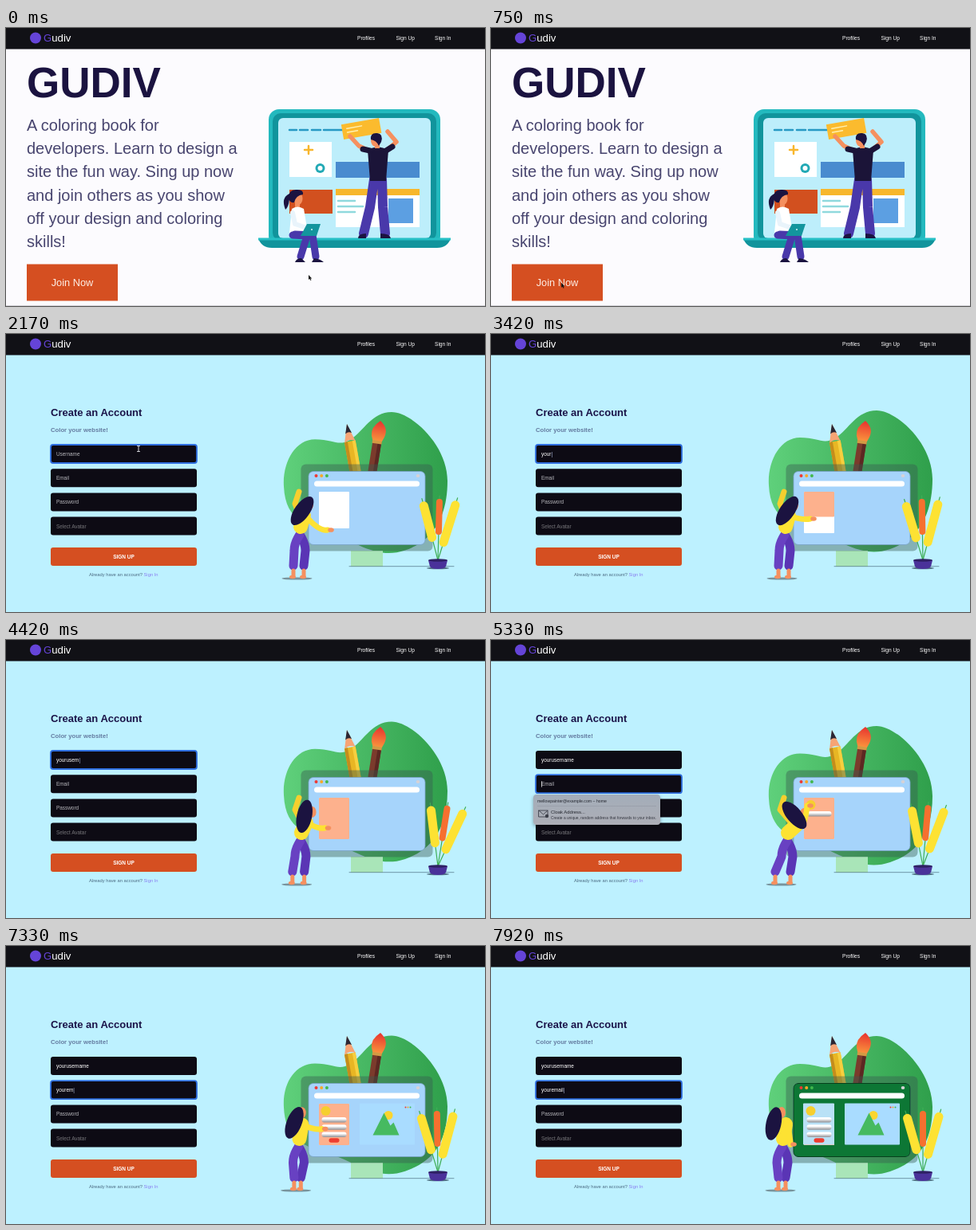
Animation, 600 px wide and 349 px high, one loop 8000 ms. Source, as an HTML page:

```html
<!DOCTYPE html>
<html lang="en">
<head>
<meta charset="utf-8">
<title>Gudiv</title>
<style>
  html, body { margin: 0; width: 100%; height: 100%; overflow: hidden; }
  svg { display: block; width: 100vw; height: 100vh; font-family: "Liberation Sans", Arial, sans-serif; }
  text { white-space: pre; }
</style>
</head>
<body>
<svg viewBox="0 0 600 349">
  <defs>
    <linearGradient id="leaf"><stop stop-color="#5fd07b"/><stop offset="1" stop-color="#2f9f4b"/></linearGradient>
    <linearGradient id="bar" x2="0" y2="1"><stop offset=".3" stop-color="#fff"/><stop offset="1" stop-color="#8d8d92"/></linearGradient>
    <linearGradient id="paint" x2="0" y2="1"><stop stop-color="#e8322f"/><stop offset="1" stop-color="#f9913c"/></linearGradient>
    <linearGradient id="popup" x2="0" y2="1"><stop stop-color="#a3adb9"/><stop offset="1" stop-color="#adaeb6"/></linearGradient>
    <filter id="shade" x="-10%" y="-20%" width="120%" height="150%"><feDropShadow dx="0" dy="2" stdDeviation="2" flood-opacity=".35"/></filter>
  </defs>
  <g id="home"></g>
  <g id="signup"></g>
  <g id="nav"></g>
  <g id="pointer"></g>
</svg>
<script>
const LOOP = 8000, PAGE_SWITCH = 1000;
const NAVY = '#1b1340', SKIN = '#f5905f', YELLOW = '#fde233', PURPLE = '#5a35b5', RUST = '#d54f21';
const LIGHTS = ['#ee3a33', '#f6a928', '#42b84c'];
const layer = id => document.getElementById(id);
const clamp = v => Math.max(0, Math.min(1, v));
const ramp = (t, from, to) => {
  const v = clamp((t - from) / (to - from));
  return v * v * (3 - 2 * v);
};

// Eased lookup in rows of [time, ...values].
function pose(t, rows) {
  const i = rows.findIndex(row => row[0] > t);
  if (i < 0) return rows[rows.length - 1].slice(1);
  if (i === 0) return rows[0].slice(1);
  const a = rows[i - 1], b = rows[i], k = ramp(t, a[0], b[0]);
  return a.slice(1).map((v, n) => v + (b[n + 1] - v) * k);
}

// Shape helpers
const rect = (x, y, w, h, fill, r = 0, extra = '') => `<rect x="${x}" y="${y}" width="${w}" height="${h}" rx="${r}" fill="${fill}" ${extra}/>`;
const oval = (x, y, rx, ry, fill, extra = '') => `<ellipse cx="${x}" cy="${y}" rx="${rx}" ry="${ry}" fill="${fill}" ${extra}/>`;
const dot = (x, y, r, fill) => oval(x, y, r, r, fill);
const path = (d, fill) => `<path d="${d}" fill="${fill}"/>`;
const line = (d, color, width) => `<path d="${d}" fill="none" stroke="${color}" stroke-width="${width}" stroke-linecap="round" stroke-linejoin="round"/>`;
const group = (transform, content) => `<g transform="${transform}">${content}</g>`;
const text = (x, y, size, fill, content, extra = '') => `<text x="${x}" y="${y}" font-size="${size}" fill="${fill}" ${extra}>${content}</text>`;
const BOLD = 'font-weight="700"', MIDDLE = 'text-anchor="middle"';

function drawNav() {
  return rect(0, 0, 600, 26.5, '#111116') + dot(37, 12.5, 7, '#6544d8') +
    text(47, 17, 13.2, '#fff', '<tspan fill="#6544d8">G</tspan>udiv') +
    ['Profiles', 'Sign Up', 'Sign In'].map((s, i) => text(440 + i * 48.5, 14.5, 6.6, '#fff', s)).join('');
}

function drawLaptop() {
  return rect(329, 102, 215, 172, '#23b9be', 13) + rect(334, 107, 205, 160, '#11949c', 10) + rect(341, 113, 191, 151, '#bdeefb', 6) +
    path('M316 264H557Q553 276 540 276H333Q320 276 316 264Z', '#11949c') + rect(316, 263.5, 241, 3, '#27c0c6');
}

function drawLayout() {
  return line('M355 128H364M368 128H378M383 128H394M398 128H421', '#2799c4', 2.5) +
    rect(355, 143, 53, 44, '#fff') + line('M379 148V158M374 153H384', '#f8b62d', 2.5) +
    dot(393.5, 176, 6, '#22a9b5') + dot(393.5, 176, 3, '#fff') +
    rect(413, 168, 105, 20, '#498bcf') + rect(355, 203, 54, 30, '#d2501f') +
    rect(413, 202, 105, 48, '#fff') + rect(413, 202, 105, 8, '#f7b72c') +
    line('M416 217H437M416 224H447M416 231H437', '#8fd9dd', 2.5) + rect(479, 214, 31, 31, '#5c9fe2') +
    group('rotate(-10 445 126)', rect(421, 117, 48, 19, '#fbbb2e') + line('M427 123H446M427 128H440', '#fff0b0', 1.5));
}

function drawMan() {
  return line('M457 155L442 148 431 136M475 155L489 143 478 130', SKIN, 5.5) +
    line('M461 190L456 225 448 258M471 190L472 225 475 258', '#4938aa', 12) +
    path('M441 264Q441 258 451 258V264ZM469 264V258Q481 258 482 264Z', NAVY) +
    path('M453 153Q465 146 479 153L476 192H456Z', '#1b1438') + line('M456 154L447 152M476 154L484 149', '#1b1438', 7) +
    rect(462, 141, 6, 10, SKIN) + oval(463, 141, 6, 8, SKIN) + path('M457 140Q456 131 465 132 473 133 470 143L467 148Q464 141 457 140Z', NAVY);
}

function drawReader() {
  return path('M355 208Q344 213 350 228 354 225 355 215Z', NAVY) + rect(362, 217, 6, 10, SKIN) + oval(366, 214, 5.5, 8, SKIN) +
    path('M354 213Q354 202 365 203 373 203 372 209 363 210 361 219 355 220 354 213Z', NAVY) +
    path('M358 227Q365 222 373 227L378 257H355Z', '#fff') + line('M359 232L362 246 374 250', '#e9f4fb', 6) +
    line('M359 260L377 261 369 287M362 259L384 260 388 287', '#4938aa', 9) +
    path('M362 294Q364 289 370 289L375 294ZM383 294L386 289Q394 290 398 294Z', NAVY) +
    path('M377 246H394L389 261H369Z', '#13959d') + dot(383, 253, 1, '#d8f5f6');
}

function drawHome() {
  const copy = ['A coloring book for', 'developers. Learn to design a', 'site the fun way. Sing up now',
    'and join others as you show', 'off your design and coloring', 'skills!'];
  return rect(0, 0, 600, 349, '#fcfbfe') + text(26, 87, 53, NAVY, 'GUDIV', BOLD) +
    copy.map((s, i) => text(26, 129 + i * 29.2, 20, '#48456f', s)).join('') +
    rect(26, 296.5, 114, 46, RUST) + text(83, 324, 12.8, '#fdeee6', 'Join Now', MIDDLE) +
    drawLaptop() + drawLayout() + drawMan() + drawReader() + rect(0, 348, 600, 1, '#d3d2d8');
}

function drawPopup() {
  return rect(53, 194, 159, 38, 'url(#popup)', 4, 'filter="url(#shade)"') +
    text(58, 203.5, 5.2, '#24262e', 'mellowpainter@example.com – home') + rect(58, 208, 149, .5, '#8d929d') +
    line('M60 214H71V222H60ZL65.5 219 71 214', '#3b3e48', .9) + dot(70, 221, 2.2, '#3b3e48') +
    text(75, 218, 5.9, '#24262e', 'Cloak Address...') +
    text(75, 225, 4.85, '#343741', 'Create a unique, random address that forwards to your inbox.');
}

function drawForm(t) {
  const typed = (word, start) => word.slice(0, Math.max(0, Math.floor((t - start) / 200)));
  const focus = t < 1750 ? -1 : t < 5050 ? 0 : 1;
  const focusStart = focus ? 5050 : 1750;
  const values = [typed('yourusername', 2580), typed('youremail', 6030)];
  const fields = ['Username', 'Email', 'Password', 'Select Avatar'].map((label, i) => {
    const y = 139 + i * 30.2, active = i === focus, value = values[i];
    const caret = active && value ? '<tspan fill="#aebbe0">|</tspan>' : '';
    const blink = active && !value && (t - focusStart) % 800 < 400;
    return rect(56, y, 183, 23, '#0d0b14', 3, active ? 'stroke="#2f6fe0" stroke-width="1.8"' : '') +
      text(63, y + 14, 6.4, value ? '#fff' : i === 3 ? '#77777b' : '#b8b8bd', (value || label) + caret) +
      (blink ? rect(63, y + 8, .7, 7.5, '#fff') : '');
  }).join('');
  return text(56, 103, 13, '#1a1348', 'Create an Account', BOLD) + text(56, 123, 7.7, '#647ba0', 'Color your website!', BOLD) + fields +
    rect(56, 268, 183, 23, RUST, 3) + text(147.5, 282.3, 6.5, '#fff', 'SIGN UP', `${BOLD} ${MIDDLE}`) +
    text(104, 304, 5.8, '#4a6a80', 'Already have an account?') + text(172.5, 304, 5.8, '#8a7ff0', 'Sign In') +
    (t > 5150 && t < 6200 ? drawPopup() : '');
}

function drawBlob(t) {
  const [swell] = pose(t, [[1000, .05], [1330, .18], [2170, .88], [3000, 1], [3420, 1], [5330, .3], [6670, .06], [7920, 0]]);
  const left = 203 - 13 * swell, lobe = 148 - 18 * swell, top = 113 - 17 * swell, right = 202 - 20 * swell, base = 283 - 13 * swell;
  return path(`M348 ${left}C346 ${left - 30} 362 ${lobe} 387 ${lobe}S416 ${lobe + 10} 432 ${lobe} 458 ${top} 483 ${top}
    553 ${right - 45} 553 ${right} 535 ${base - 12} 500 ${base} 440 ${base - 10} 410 ${base - 20} 350 ${left + 45} 348 ${left}Z`, 'url(#leaf)');
}

function drawTools() {
  const pencil = rect(-7, 22, 14, 40, '#e8b624') + rect(-7, 22, 4, 40, '#c48d1c') + rect(3, 22, 4, 40, '#f6cf3f') +
    path('M0 0L-7 23Q0 18 7 23Z', '#f6a475') + path('M0 0L-4 12Q0 9 4 12Z', '#2b2633');
  const brush = rect(-5.5, 26, 11, 39, '#7b3b2c') + rect(1, 26, 4.5, 39, '#5c2822') + rect(-6, 23, 12, 6, '#d39a43') +
    path('M0 0Q12 8 8 20L6 25H-6L-8 20Q-11 10 0 0Z', 'url(#paint)');
  return group('translate(427 113) rotate(-10)', pencil) + group('translate(469 109) rotate(9)', brush);
}

function drawScreen(t) {
  const dark = ramp(t, 7400, 7600);
  const cardHeight = 46 * ramp(t, 1650, 2120) + 6 * ramp(t, 2180, 2500), peach = 52 * ramp(t, 2850, 3850);
  const pop = (start, x, y, shape) => {
    const k = ramp(t, start, start + 250);
    return k ? group(`translate(${x} ${y}) scale(${k})`, shape) : '';
  };
  const bars = [4950, 5600, 6050].map((start, i) => pop(start, 411, 218 + i * 9.3, rect(-15.5, -3, 31, 6.5, 'url(#bar)', 3))).join('');
  const picture = rect(-34.5, -26, 69, 52, '#a9dcff', 1) + LIGHTS.map((c, i) => dot(23 + i * 3, -21, 1, c)).join('') +
    dot(1.5, -11, 5.5, '#fbd52e') + path('M-18 14L-4 -14 4 2 8 -2 15 14Z', '#46ba60');
  return rect(432, 272, 40, 20, '#a9e5b8') + rect(369.5, 163.5, 165, 109, 'rgba(55,90,80,.42)', 6) +
    rect(379, 172.5, 146, 92, '#a6d4fb', 6, 'stroke="#7aa4c8" stroke-width=".8"') +
    rect(379, 172.5, 146, 92, '#0d7735', 6, `opacity="${dark}" stroke="#06401c"`) +
    LIGHTS.map((c, i) => dot(388.5 + i * 6.7, 178, 2, c)).join('') + oval(516, 178, 2.3, 2, '#d6d2d6') +
    rect(386, 184.5, 132, 7, '#fff', 3.5) +
    rect(392, 198, 38, cardHeight, '#fff', 1) + rect(392, 198, 38, peach, '#fdb18d', 1) + rect(391, 197.5, 39, 52, '#b9e1f6', 1, `opacity="${dark}"`) +
    pop(4700, 400.5, 207, dot(0, 0, 6, '#f6cf2e')) + bars + pop(6400, 411, 244, rect(-6.5, -2.7, 13, 5.4, '#ed3d30', 2.7)) +
    pop(7050, 477.5, 223.5, picture);
}

function drawPlant(t) {
  const [sway] = pose(t, [[1500, 6], [2170, .5], [2900, -1], [3420, -2], [4200, 8.5], [5330, 4], [5920, 1], [6670, -3], [7920, -1]]);
  const reed = (angle, near, far, width, color) => group(`translate(541 284) rotate(${angle + sway})`,
    line(`M0 0V${-far - 4}`, '#3fae55', 1.2) + rect(-width / 2, -far, width, far - near, color, width / 2));
  return reed(-15, 24, 76, 11, YELLOW) + reed(17, 18, 78, 11, YELLOW) + reed(1, 32, 77, 8, '#f6702f') +
    line('M430 291.7H561', '#4d7080', .7) + oval(541, 294, 14, 1.3, '#527484') +
    path('M529 284H553L551 292Q549 295 541 295T531 292Z', '#4a329a') + oval(541, 284, 12, 1.8, '#2e2064');
}

function drawPainter(t) {
  const [headX, headY, hairX, hairY, tilt] = pose(t, [
    [1650, 375, 206, 368, 219, 22], [2170, 378, 212, 371, 222, 35], [3900, 378, 213, 371, 222, 34],
    [5330, 390, 216, 380, 220, -40], [6670, 385, 208, 378, 219, 43], [7700, 362, 207, 354, 223, 12]]);
  const [shoulderX, shoulderY, hip, footLeft, footRight] = pose(t, [
    [3900, 373, 228, 368, 360, 373], [5330, 383, 232, 371, 356, 375], [6670, 374, 225, 370, 363, 370], [7700, 369, 224, 365, 360, 369]]);
  const [handX, handY] = pose(t, [
    [1650, 406, 209], [2170, 407, 246], [2850, 404, 202], [3420, 404, 232], [3900, 405, 248],
    [5330, 400, 208], [6670, 394, 246], [7100, 410, 220], [7700, 379, 249]]);
  const drop = ramp(t, 7100, 7700);
  const leg = (knee, foot, color) => line(`M${hip} 252Q${knee} 262 ${knee} 272L${foot} 291`, color, 11) +
    line(`M${foot} 297V303`, SKIN, 5) + oval(foot - 1, 305, 4, 2.2, SKIN);
  return oval((footLeft + footRight) / 2 - 2, 307, 19, 1.6, '#78949d') +
    line(`M${shoulderX - 5} ${shoulderY}L362 ${213 + 8 * drop} 367 ${198 + 24 * drop}`, '#f6cf2e', 7 * (1 - drop)) +
    leg(hip + 7, footRight, PURPLE) + leg(hip - 7, footLeft, '#6841c2') +
    line(`M${hip + 1} 242L${shoulderX} ${shoulderY}`, YELLOW, 18) +
    oval(headX + 2, headY + 2, 5, 7, SKIN) +
    line(`M${shoulderX + 3} ${shoulderY + 1}Q${(shoulderX + handX) / 2 + 2} ${Math.max(shoulderY, handY) + 2} ${handX - 4} ${handY}`, YELLOW, 7) +
    oval(handX, handY, 3.8, 2.8, SKIN) +
    oval(hairX, hairY, 9.5, 21, NAVY, `transform="rotate(${tilt} ${hairX} ${hairY})"`);
}

function drawPointer(t) {
  if (t > 2750) return '';
  const [x, y] = pose(t, [[100, 379, 310], [800, 84, 320], [1000, 84, 320], [1300, 166, 144]]);
  return group(`translate(${x} ${y})`, t > 1280
    ? line('M-1.5 -3.5H1.5M0 -3.5V3.5M-1.5 3.5H1.5', '#d5d5da', 1)
    : path('M0 0V6L1.4 4.8 2.4 7 3.4 6.5 2.4 4.4H4.2Z', '#111'));
}

layer('nav').innerHTML = drawNav();
layer('home').innerHTML = drawHome();

function frame(now) {
  const t = now % LOOP;
  layer('signup').innerHTML = t < PAGE_SWITCH ? '' : rect(0, 0, 600, 349, '#bdf1ff') + drawBlob(t) + drawTools() +
    drawScreen(t) + drawPlant(t) + drawPainter(t) + drawForm(t);
  layer('pointer').innerHTML = drawPointer(t);
  requestAnimationFrame(frame);
}
requestAnimationFrame(frame);
</script>
</body>
</html>
```
